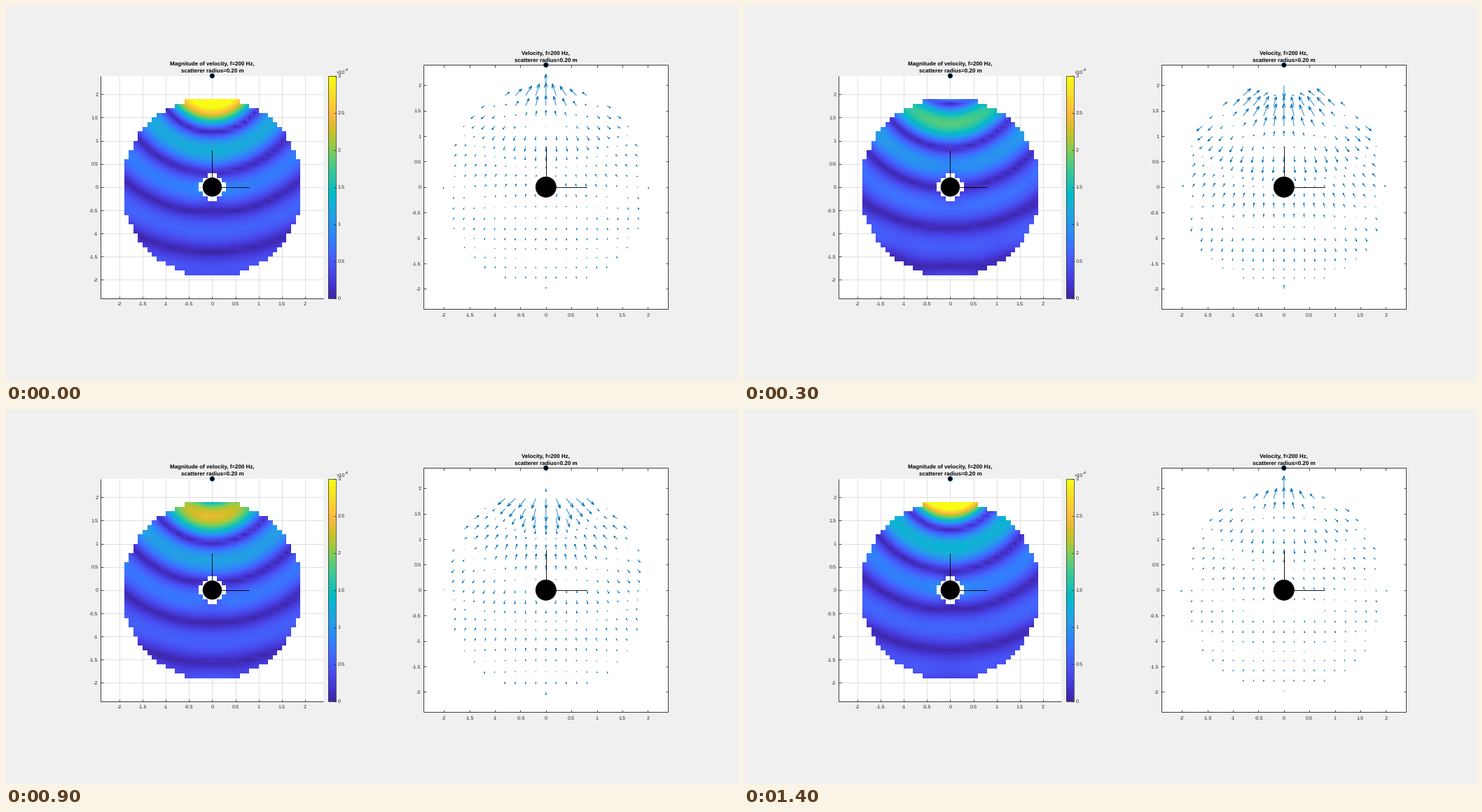
A matplotlib script for the animation above (1.5 s loop, 1045x536 px).

```python
import numpy as np
import matplotlib.pyplot as plt
from matplotlib.animation import FuncAnimation
from matplotlib.collections import LineCollection
from matplotlib.colors import LinearSegmentedColormap
from matplotlib.patches import Circle, Rectangle
from numpy.polynomial.legendre import Legendre

plt.rcParams["text.hinting"] = "none"

W, H, DPI = 1045, 536, 100
FRAMES, INTERVAL = 15, 100
PX = 72 / DPI
INK, BLUE = "#262626", "#0072bd"
LIMIT, CLIM = 2.4, 3e-4
TICKS = np.arange(-2, 2.1, 0.5)

# Acoustics: point source above a rigid sphere, as a truncated modal series
SPEED, DENSITY, FREQ = 340.0, 1.2, 200.0
K = 2 * np.pi * FREQ / SPEED
RADIUS, SOURCE, ORDER = 0.2, 2.4, 10

STOPS = [(0, "#3e26a8"), (4, "#4537d5"), (9, "#4852f4"), (14, "#3e6fff"),
         (16, "#327cfc"), (18, "#2e87f7"), (23, "#23a0e5"), (27, "#12b1d6"),
         (29, "#01b8ca"), (31, "#0bbdbd"), (33, "#24c1ae"), (36, "#37c897"),
         (41, "#72cd64"), (45, "#abc739"), (48, "#d1bf27"), (52, "#f8ba3d"),
         (54, "#fec338"), (58, "#f7dc2a"), (63, "#f9fb15")]
CMAP = LinearSegmentedColormap.from_list(
    "sea_to_sun", [(i / 63, c) for i, c in STOPS], N=64)
CMAP.set_bad((0, 0, 0, 0))


def hankel(z):
    """Spherical Hankel functions and derivatives for orders 0..ORDER."""
    z = np.asarray(z, float)
    h = [-1j * np.exp(1j * z) / z]
    h.append(h[0] / z - 1j * h[0])
    for n in range(1, ORDER + 1):
        h.append((2 * n + 1) / z * h[n] - h[n - 1])
    dh = [n / z * h[n] - h[n + 1] for n in range(ORDER + 1)]
    return h, dh


def velocity(x, y):
    """Complex velocity components of incident plus scattered sound."""
    r = np.maximum(np.hypot(x, y), RADIUS / 2)
    mu = y / r
    h, dh = hankel(K * r)
    _, dh_wall = hankel(K * RADIUS)
    h_src, _ = hankel(K * SOURCE)
    p_r = p_mu = 0
    for n in range(ORDER + 1):
        c = 1j * K * (2 * n + 1) * h_src[n]
        echo = dh_wall[n].real / dh_wall[n]
        leg = Legendre.basis(n)
        p_r = p_r + c * K * (dh[n].real - echo * dh[n]) * leg(mu)
        p_mu = p_mu + c * (h[n].real - echo * h[n]) * leg.deriv()(mu)
    gx = p_r * x / r - p_mu * mu * x / r ** 2
    gy = p_r * mu + p_mu * (1 - mu ** 2) / r
    scale = 1 / (4 * np.pi * 1j * 2 * np.pi * FREQ * DENSITY)
    return gx * scale, gy * scale


def ring_grid(step):
    n = round(2 / step)
    axis = np.arange(-n, n + 1) * step
    x, y = np.meshgrid(axis, axis)
    r = np.hypot(x, y)
    return x, y, (r <= 2 + 1e-9) & (r > RADIUS + 1e-9)


fig = plt.figure(figsize=(W / DPI, H / DPI), dpi=DPI, facecolor="#f0f0f0")
ax = fig.add_axes([0, 0, 1, 1])
ax.axis("off")


def line(x0, y0, x1, y1, color=INK, width=0.8, z=3):
    ax.plot([x0, x1], [y0, y1], color=color, lw=width * PX, zorder=z,
            solid_capstyle="butt")


def label(x, y, text, size=7.3, ha="center", color=INK, weight="normal"):
    ax.text(x, y, text, fontsize=size * PX, ha=ha, va="baseline", color=color,
            family="Liberation Sans", weight=weight, zorder=8)


class Panel:
    def __init__(self, cx, cy, size, title, grid=False, box=False):
        self.cx, self.cy, self.scale = cx, cy, size / (2 * LIMIT)
        half, tick = size / 2, size * 0.01
        left, right, top, bottom = cx - half, cx + half, cy - half, cy + half
        ax.add_patch(Rectangle((left, top), size, size, fc="white", lw=0, zorder=0))
        for t in TICKS:
            px, py = self.to_px(t, t)
            if grid:
                line(px, top, px, bottom, "#dfdfdf", 1, 1)
                line(left, py, right, py, "#dfdfdf", 1, 1)
            line(px, bottom, px, bottom - tick)
            line(left, py, left + tick, py)
            if box:
                line(px, top, px, top + tick)
                line(right, py, right - tick, py)
            label(px, bottom + 10.5, f"{t:g}")
            label(left - 4, py + 2.6, f"{t:g}", ha="right")
        line(left, top, left, bottom, width=0.9)
        line(left, bottom, right, bottom, width=0.9)
        if box:
            line(left, top, right, top, width=0.9)
            line(right, top, right, bottom, width=0.9)
        for text, up in ((title, 14.2), ("scatterer radius=0.20 m", 4.4)):
            label(cx, top - up, text, 8, color="black", weight="bold")

        ax.add_patch(Circle((cx, cy), RADIUS * self.scale, fc="black",
                            ec="black", lw=0.8 * PX, zorder=6))
        reach = 0.8 * self.scale
        line(cx, cy, cx, cy - reach, "black", 0.9, 6)
        line(cx, cy, cx + reach, cy, "black", 0.9, 6)
        ax.add_patch(Circle((cx, top), 3.4, fc="black", ec=BLUE,
                            lw=0.6 * PX, zorder=9))

    def to_px(self, x, y):
        return self.cx + x * self.scale, self.cy - y * self.scale


field = Panel(294.4, 258.8, 318, "Magnitude of velocity, f=200 Hz,", grid=True)
arrows = Panel(770.8, 258.8, 349, "Velocity, f=200 Hz,", box=True)

# Colour bar
BAR_L, BAR_R, BAR_T, BAR_B = 459.7, 470.5, 99.8, 417.8
ax.imshow(np.linspace(1, 0, 318)[:, None], cmap=CMAP, aspect="auto",
          extent=(BAR_L, BAR_R, BAR_B, BAR_T), zorder=2)
ax.add_patch(Rectangle((BAR_L, BAR_T), BAR_R - BAR_L, BAR_B - BAR_T,
                       fc="none", ec=INK, lw=0.7 * PX, zorder=3))
for value in np.arange(0, 3.1, 0.5):
    py = BAR_B - value / 3 * (BAR_B - BAR_T)
    line(BAR_R - 3, py, BAR_R, py)
    label(BAR_R + 3.2, py + 2.6, f"{value:g}", ha="left")
label(471, 96.5, "×10", ha="left")
label(483.5, 93, "-4", 5.6, ha="left")

# Surface: every pixel is interpolated within one of two triangles per cell
STEP = 0.1
sx, sy, s_valid = ring_grid(STEP)
s_vel = velocity(sx, sy)
X0, X1, Y0, Y1 = 168, 422, 132, 386
fx = ((np.arange(X0, X1) + 0.5 - field.cx) / field.scale + 2) / STEP
fy = ((field.cy - np.arange(Y0, Y1) - 0.5) / field.scale + 2) / STEP
fx, fy = np.meshgrid(fx, fy)
col, row = fx.astype(int), fy.astype(int)
u, v = fx - col, fy - row


def corners(a):
    return a[row, col], a[row, col + 1], a[row + 1, col], a[row + 1, col + 1]


hidden = ~np.logical_and.reduce(corners(s_valid))
surface = ax.imshow(np.zeros(fx.shape), cmap=CMAP, vmin=0, vmax=CLIM,
                    extent=(X0, X1, Y1, Y0), interpolation="nearest",
                    aspect="auto", zorder=2)

# Arrows: the longest one always spans the same share of the grid spacing
qx, qy, q_valid = ring_grid(0.2)
LONGEST = 0.9 * np.sqrt(2) * 4 / len(qx)
qx, qy = qx[q_valid], qy[q_valid]
q_vel = velocity(qx, qy)
quiver = LineCollection([], colors=BLUE, linewidths=0.85 * PX, zorder=4,
                        capstyle="butt", joinstyle="miter")
ax.add_collection(quiver, autolim=False)
ax.set_xlim(0, W)
ax.set_ylim(H, 0)


def at_time(vel, turn):
    return [(part * turn).real for part in vel]


def update(n):
    turn = np.exp(-2j * np.pi * n / FRAMES)

    z00, z10, z01, z11 = corners(np.hypot(*at_time(s_vel, turn)))
    lower = z00 + u * (z10 - z00) + v * (z01 - z00)
    upper = z11 + (1 - u) * (z01 - z11) + (1 - v) * (z10 - z11)
    surface.set_data(np.ma.array(np.where(u + v <= 1, lower, upper), mask=hidden))

    du, dv = at_time(q_vel, turn)
    grow = LONGEST / np.hypot(du, dv).max()
    du, dv = du * grow, dv * grow
    tip_x, tip_y = qx + du, qy + dv
    back, side = 0.34, 0.125
    points = [(qx, qy), (tip_x, tip_y),
              (tip_x - back * du - side * dv, tip_y - back * dv + side * du),
              (tip_x, tip_y),
              (tip_x - back * du + side * dv, tip_y - back * dv - side * du)]
    path = [np.stack(arrows.to_px(*p), axis=-1) for p in points]
    quiver.set_segments(np.stack(path, axis=1))
    return surface, quiver


anim = FuncAnimation(fig, update, frames=FRAMES, interval=INTERVAL,
                     repeat=True, repeat_delay=0, blit=False)
plt.show()
```
